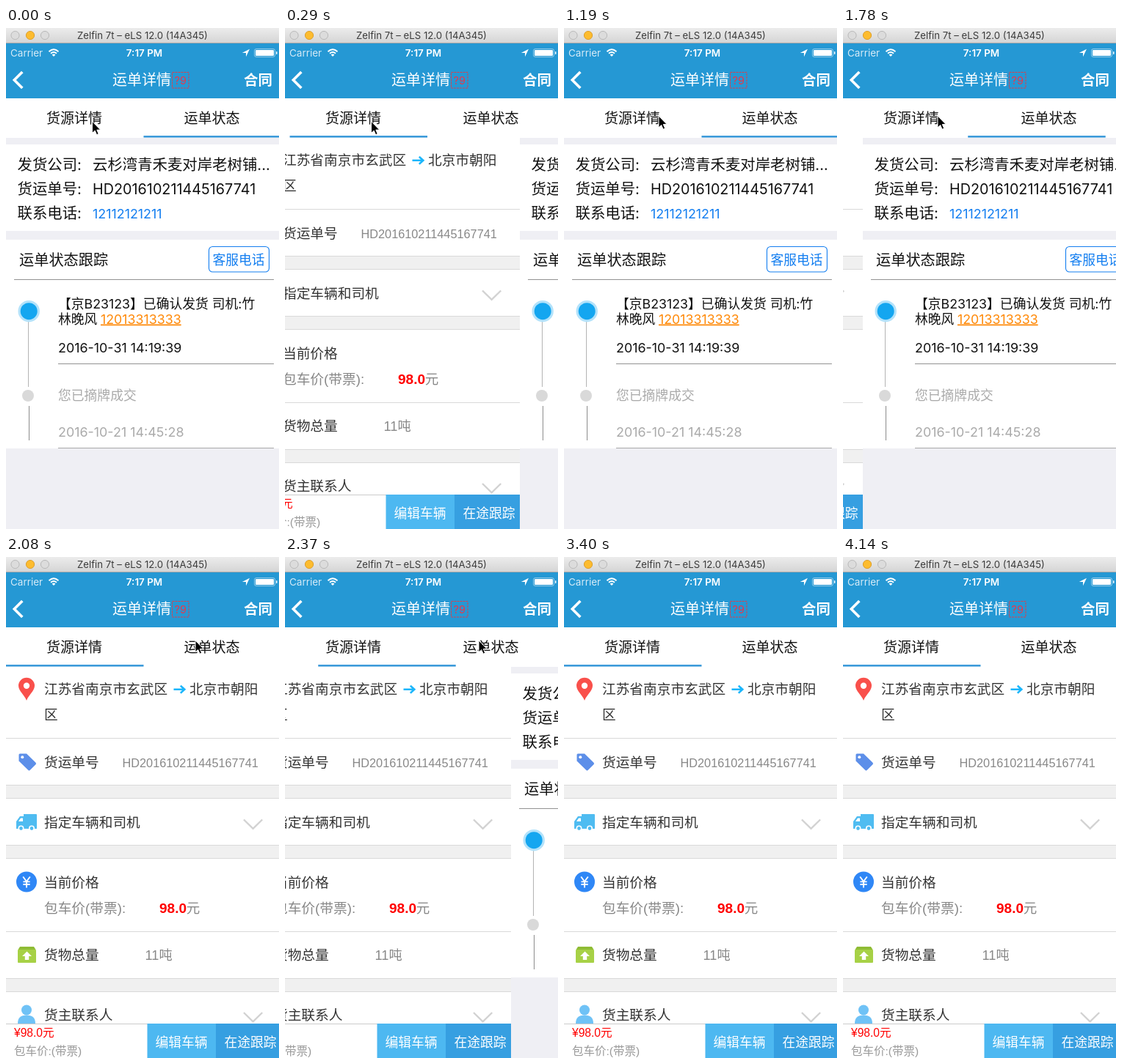
These frames come from a looping animation (372x684 px, 4590 ms). An HTML page:

```html
<!DOCTYPE html>
<html lang="zh-CN">
<head>
<meta charset="utf-8">
<title>运单详情</title>
<style>
  html, body { margin: 0; width: 100%; height: 100%; overflow: hidden; background: #efeff4; }
  svg { display: block; }
  text { font-family: Inter, "Noto Sans CJK SC", "Noto Sans CJK", sans-serif; white-space: pre; }
  .web { font-family: "Liberation Sans", "Noto Sans CJK SC", "Noto Sans CJK", sans-serif; }
</style>
</head>
<body>
<svg id="stage" width="372" height="684" viewBox="0 0 372 684"></svg>
<script>
// The phone screen is slightly wider than the visible stage.
const W = 372, PAGE = 375, TAB = PAGE / 2, LOOP = 4590;

const rect = (x, y, w, h, fill, more = '') =>
  `<rect x="${x}" y="${y}" width="${w}" height="${h}" fill="${fill}" ${more}/>`;
const circle = (x, y, r, fill, more = '') =>
  `<circle cx="${x}" cy="${y}" r="${r}" fill="${fill}" ${more}/>`;
const path = (d, fill, more = '') => `<path d="${d}" fill="${fill}" ${more}/>`;
const stroke = (d, color, width, more = '') =>
  path(d, 'none', `stroke="${color}" stroke-width="${width}" ${more}`);
const text = (x, y, size, fill, str, more = '') =>
  `<text x="${x}" y="${y}" font-size="${size}" fill="${fill}" ${more}>${str}</text>`;
const web = (x, y, size, fill, str, more = '') =>
  text(x, y, size, fill, str, `class="web" ${more}`);

function windowBar() {
  const light = (x, fill, edge) => circle(x, 10, 5.6, fill, `stroke="${edge}" stroke-width="1"`);
  return rect(0, 0, W, 21, 'url(#bar)') + rect(0, 20, W, 1, '#a9a9a9') +
    light(12.5, '#dcdcdc', '#b9b9b9') + light(33, '#fdbc2f', '#dd9f2c') + light(53, '#dcdcdc', '#b9b9b9') +
    text(186, 15, 13.2, '#3c3c3c', 'Zelfin 7t – eLS 12.0 (14A345)', 'text-anchor="middle"');
}

function navBar() {
  const white = '#fff';
  return rect(0, 21, W, 75, '#2598d4') +
    text(6, 38.5, 13.5, '#d6ebf7', 'Carrier') +
    stroke('M58.5 32.2 Q65 26.5 71.5 32.2 M61 34.8 Q65 31.4 69 34.8', white, 1.9) +
    path('M62.6 36.4 Q65 34.4 67.4 36.4 L65 39z', white) +
    text(188.5, 38.5, 13.4, white, '7:17 PM', 'text-anchor="middle" font-weight="600"') +
    path('M332 28.8 L321.8 33.9 H327 V39.2z', white) +
    rect(338.5, 28.5, 28, 11, 'none', 'rx="2.6" stroke="#fff" stroke-opacity=".5"') +
    rect(340, 30, 25, 8, white, 'rx="1.2"') + rect(368, 32, 1.5, 4, white, 'rx=".7"') +
    stroke('M22.3 60 L11.3 71 L22.3 82', white, 3.6) +
    text(145, 78, 20, white, '运单详情', 'font-weight="300"') +
    rect(226.5, 60.5, 22.5, 21.5, 'none', 'stroke="#d8404c" stroke-dasharray="3 1"') +
    text(229.5, 76.5, 14.5, '#e8384a', '?9') +
    text(324, 78, 19.5, white, '合同', 'font-weight="600"');
}

function tabs() {
  return rect(0, 96, W, 54, '#fff') +
    text(55, 129.8, 19, '#111', '货源详情') + text(242.5, 129.8, 19, '#111', '运单状态') +
    rect(0, 147, TAB, 2.6, '#3c9ada', 'id="mark"');
}

function cargoPage() {
  const dark = '#333', soft = '#888';
  const rule = y => rect(0, y, PAGE, 1, '#d9d9d9');
  const band = (y, h) => rect(0, y, PAGE, h, '#f0f0f0') + rule(y) + rule(y + h - 1);
  const label = (y, str) => web(52, y, 18.7, dark, str);
  const fold = y => stroke(`M324 ${y} l12.6 12.4 l12.6 -12.4`, '#d2d2d2', 2.4);
  const icons =
    path('M28 196 C25 188 17 183 17 175.8 A11 11 0 0 1 39 175.8 C39 183 31 188 28 196z', '#f9504b') +
    circle(28, 175.8, 4.2, '#fff') +
    path('M17.5 270 q0-1.5 1.5-1.5 h9 l12.5 12.3 q1.2 1.2 0 2.4 l-7.8 7.8 q-1.2 1.2-2.4 0 L17.5 278.5z', '#5d8fe9') +
    circle(22.3, 273.3, 2, '#fff') +
    path('M24 351 H41 q1 0 1 1 V371 H14 V361 L19 354 H24z', '#4fbcf1') +
    path('M17 361 l3-4.5 h3 v4.5z', '#fff') +
    [20.5, 35].map(x => circle(x, 370.5, 3.2, '#4fbcf1', 'stroke="#fff" stroke-width="1.6"')).join('') +
    circle(28, 443.5, 14, '#2f87f6') +
    stroke('M23.2 436.5 L28 443 L32.8 436.5 M28 443 V451.5 M23.4 443.4 H32.6 M23.4 447 H32.6', '#fff', 1.9) +
    path('M19 532 H38 L40.5 536 H16.5z', '#8fbc35') + rect(16, 536, 25, 18, '#a7d146', 'rx="1"') +
    path('M28.5 538.5 l6.5 6.5 h-3.8 v5 h-5.4 v-5 h-3.8z', '#fff') +
    circle(28, 618.5, 7, '#6fc2f6') + path('M16 637 C16 629 20 625.5 28 625.5 S40 629 40 637z', '#6fc2f6');
  return rect(0, 150, PAGE, 534, '#fff') + icons +
    label(187, '江苏省南京市玄武区') +
    stroke('M228.5 180.8 H243 M237.8 175.8 L243.4 180.8 L237.8 185.8', '#1cb6fb', 2.5) +
    web(250, 187, 18.7, dark, '北京市朝阳') + label(222, '区') + rule(247) +
    label(287, '货运单号') + web(158.5, 287, 16.3, soft, 'HD201610211445167741') + band(311, 19) +
    label(369, '指定车辆和司机') + fold(358.5) + band(393, 19) +
    label(451, '当前价格') + web(52, 486, 18.7, soft, '包车价(带票):') +
    web(209, 486, 19, '#f00', '98.0', 'font-weight="700"') + web(245.7, 486, 18.5, soft, '元') + rule(511) +
    label(550, '货物总量') + web(189.5, 550, 18.2, soft, '11吨') + band(575, 19) +
    label(632, '货主联系人') + fold(622) +
    rect(0, 637, PAGE, 47, '#fff') + rect(0, 637, PAGE, 1, '#ccc') +
    web(11, 655, 15.6, '#f00', '¥98.0元') + web(11, 680, 15.5, '#999', '包车价:(带票)') +
    rect(192.5, 637, 93.5, 47, '#4db8f1') + rect(286, 637, PAGE - 286, 47, '#369fe1') +
    web(203.5, 669, 17.8, '#fff', '编辑车辆') + web(297.5, 669, 17.8, '#fff', '在途跟踪');
}

function statusPage() {
  const ink = '#111', faint = '#aaa', blue = '#137ef0', orange = '#ff8a0a';
  const field = (y, name, size, value, fill = ink) =>
    text(15.5, y, 20.4, ink, name + ':') + text(118, y, size, fill, value);
  const rule = (x, y, color) => rect(x, y, 365 - x, 1, color);
  return rect(0, 150, PAGE, 534, '#efeff4') +
    rect(0, 159, PAGE, 118, '#fff') +
    field(193.5, '发货公司', 20.4, '云杉湾青禾麦对岸老树铺...') +
    field(226.5, '货运单号', 19.8, 'HD201610211445167741') +
    field(260, '联系电话', 17.9, '12112121211', blue) +
    rect(0, 289, PAGE, 285, '#fff') +
    text(18, 324, 20.2, ink, '运单状态跟踪') +
    rect(276.5, 298.5, 82, 34.5, 'none', `rx="5" stroke="${blue}" stroke-width="1.1"`) +
    text(281.5, 322.5, 17.8, blue, '客服电话') +
    rule(11, 343, '#929292') +
    rect(30, 400, 1, 90, '#b4b4b4') + rect(31, 516, 1, 47, '#8c8c8c') +
    circle(31.2, 386.7, 14.7, '#b3e2fa') + circle(31.2, 386.7, 11.5, '#14a6f0') + circle(30, 502, 8, '#d9d9d9') +
    text(71, 383, 17.8, ink, '【京B23123】已确认发货 司机:竹') +
    text(71, 403.5, 17.8, ink, '林晚风') +
    text(129, 403.5, 17.8, orange, '12013313333', 'text-decoration="underline"') +
    text(71, 443, 17.9, ink, '2016-10-31 14:19:39') + rule(71, 458, '#929292') +
    text(71, 508, 17.8, faint, '您已摘牌成交') +
    text(71, 558, 17.9, faint, '2016-10-21 14:45:28') + rule(71, 573, '#a8a8a8');
}

const stage = document.getElementById('stage');
stage.innerHTML =
  '<defs><linearGradient id="bar" x2="0" y2="1"><stop stop-color="#ececec"/>' +
  '<stop offset="1" stop-color="#d4d4d4"/></linearGradient></defs>' +
  `<g id="pages">${cargoPage()}<g transform="translate(${PAGE})">${statusPage()}</g></g>` +
  tabs() + navBar() + windowBar() +
  path('M0 0 V16 L3.7 12.6 L6.1 18.2 L8.7 17.1 L6.3 11.6 H11.2z', '#000',
    'id="cursor" stroke="#fff" stroke-width="1" stroke-linejoin="round"');

const TICKS = [0, 140, 290, 440, 590, 890, 1040, 1190, 1780, 1930, 2080, 2230, 2370, 2520,
  2670, 2820, 3110, 3260, 3400, 3550, 3850, 4000, 4140];
// Tab switches: start time, tab slid to.
const SLIDES = [[70, 0], [770, 1], [1724, 0], [2282, 1], [2992, 0]];
// Pointer: time, x, y; no position means out of sight.
const POINTER = [[0, 117.5, 127.5], [440, 131, 128], [590, 227, 124], [1040, 195, 120], [1190, 129, 120],
  [1930, 170, 118], [2080, 258, 114], [2230, 264, 114], [2670, 231, 114], [2820, 119, 118], [3260],
  [3550, 365, 652], [3850, 364, 661], [4000, 361, 682], [4140]];

// cubic-bezier(.42, 0, .58, 1)
function easeInOut(p) {
  if (p <= 0 || p >= 1) return p <= 0 ? 0 : 1;
  let lo = 0, hi = 1, s;
  for (let i = 0; i < 24; i++) {
    s = (lo + hi) / 2;
    const x = 1.26 * (1 - s) ** 2 * s + 1.74 * (1 - s) * s * s + s ** 3;
    if (x < p) lo = s; else hi = s;
  }
  return s * s * (3 - 2 * s);
}

function tabAt(t, delay, length) {
  const slide = SLIDES.findLast(s => s[0] <= t);
  if (!slide) return 1;
  const k = easeInOut((t - slide[0] - delay) / length);
  return slide[1] ? k : 1 - k;
}

const pages = document.getElementById('pages');
const mark = document.getElementById('mark');
const cursor = document.getElementById('cursor');

function draw(now) {
  const time = now % LOOP;
  const t = TICKS.findLast(v => v <= time);
  pages.setAttribute('transform', `translate(${-Math.round(PAGE * tabAt(t, 0, 300))})`);
  mark.setAttribute('x', TAB * tabAt(t, 3, 250));
  const [, x, y] = POINTER.findLast(p => p[0] <= t);
  cursor.setAttribute('visibility', x === undefined ? 'hidden' : 'visible');
  if (x !== undefined) cursor.setAttribute('transform', `translate(${x} ${y})`);
}

function loop() {
  draw(performance.now());
  requestAnimationFrame(loop);
}
draw(0);
requestAnimationFrame(loop);
</script>
</body>
</html>
```
